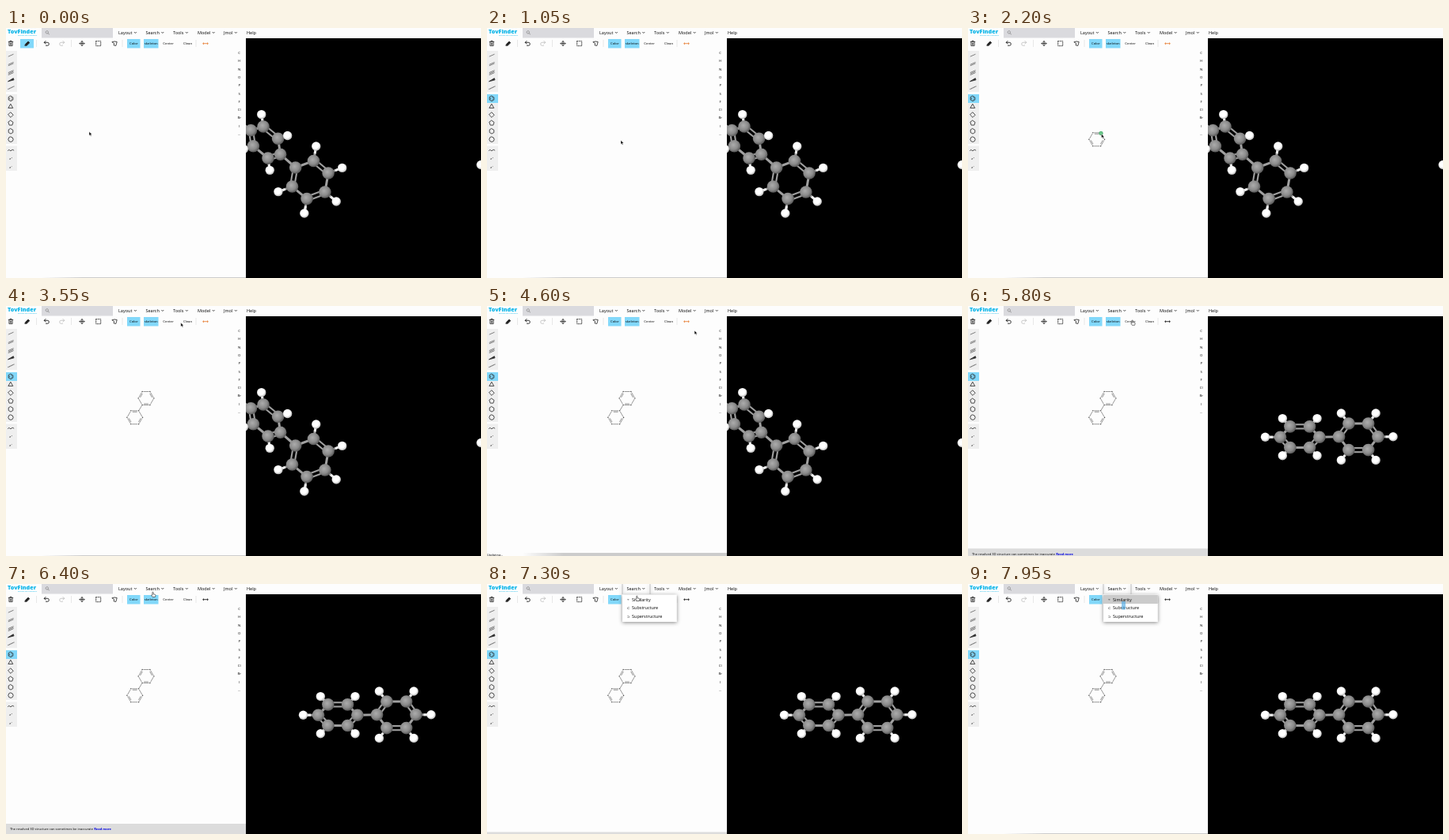
Recreate the animation shown at these times as an HTML page. Size 600x317 px, loop 8000 ms.

```html
<!DOCTYPE html>
<html lang="en">
<head>
<meta charset="utf-8">
<title>Molecule editor</title>
<style>
html, body { margin: 0; width: 100%; height: 100%; overflow: hidden; background: #fff }
svg { display: block; width: 100vw; height: 100vh; font-family: "Open Sans", "Noto Sans", sans-serif }
.line { fill: none; stroke: #222; stroke-width: .8; stroke-linecap: round; stroke-linejoin: round }
.menu { font-size: 5.5px }
.tool { font-size: 4.3px; text-anchor: middle }
.on { fill: #82d8fa }
#drop { filter: drop-shadow(0 1.5px 2.5px #0007) }
</style>
</head>
<body>
<svg id="stage" viewBox="0 0 600 317">
  <defs>
    <radialGradient id="carbon" cx=".42" cy=".4" r=".64">
      <stop offset="0" stop-color="#acacac"/><stop offset=".6" stop-color="#8a8a8a"/><stop offset="1" stop-color="#505050"/>
    </radialGradient>
    <radialGradient id="hydrogen" cx=".45" cy=".42" r=".62">
      <stop offset=".55" stop-color="#fff"/><stop offset="1" stop-color="#aaa"/>
    </radialGradient>
    <linearGradient id="fade">
      <stop offset="0" stop-color="#ccc" stop-opacity="0"/><stop offset=".2" stop-color="#ccc"/>
    </linearGradient>
    <clipPath id="view"><path d="M303 13H600V317H303z"/></clipPath>
  </defs>
  <path fill="#fdfdfd" d="M0 0H600V317H0z"/>
  <path fill="#efefef" d="M0 29H14V81H0zM0 84H14V147H0zM0 149.500H14V181H0z"/>
  <path fill="#dadade" d="M45 0H135V12.500H45z"/>
  <path id="shade" fill="url(#fade)" d="M45 0H303V4H45z"/>
  <path d="M303 13H600V317H303z"/>

  <text x="2" y="7.400" font-size="7.200" font-weight="800" fill="#08b4e8">TovFinder</text>
  <text x="15" y="10.200" font-size="2.400" fill="#08b4e8">Explore the chemistry</text>
  <path class="line" style="stroke:#888" d="M53.100 6.500a1.700 1.700 0 1 0 -.1 .1L54.600 8"/>

  <path id="pen" class="on" d="M18 14H35V25.500H18z"/>
  <path id="ring" class="on" d="M0 84H14V95H0z"/>
  <path class="on" d="M153 14H169.500V25.500H153zM174 14H192.500V25.500H174z"/>
  <path stroke="#ddd" stroke-width=".7" d="M38.500 15v9M82.500 15v9M147 15v9M240 15v9"/>

  <g class="line">
    <path d="M3.200 17.400H8.800M5 17V16.300H7V17M3.900 17.600V22.600H8.100V17.600M5.300 19V21.300M6.700 19V21.300"/>
    <path d="M24.500 20.500L28 17L29.800 18.700L26.200 22.200L24.200 22.400z" fill="#222"/>
    <path id="undo" stroke="currentColor" d="M50 16.500L48.200 18.300L50 20.100M48.400 18.300H52.300a2 2 0 0 1 0 4H50.500"/>
    <use href="#undo" color="#bbb" transform="matrix(-1 0 0 1 122 0)"/>
    <path stroke-dasharray="1.200 1.300" d="M113.700 16.700h6v6h-6z"/>
    <path d="M134.200 17.700L137 17L140.200 17.600L138.800 22.500L136 21.800L136.600 20z"/>
    <path d="M2.800 67.600L9.300 63.700L9.900 65.500z" fill="#222"/>
    <path d="M2.800 77.500L10 74" stroke="#777" stroke-dasharray=".4 1.200" stroke-width="1.200"/>
    <path d="M2.500 155.500Q3.500 153.500 4.700 155T7 155T9.800 155"/>
  </g>
  <g id="icons"></g>
  <g class="tool" font-style="italic"><text x="6" y="167">e⁺</text><text x="6" y="177.500">e⁻</text></g>
  <path id="resolve" fill="none" stroke-width=".9" d="M248.700 19.700h6.600M250 18.500l-1.300 1.200l1.300 1.200M254 18.500l1.300 1.200l-1.300 1.200"/>

  <g id="sketch1"></g>
  <g id="sketch2"></g>
  <circle id="hot" cx="168" cy="133.500" r="2.300" fill="#6cc98a" stroke="#259650" stroke-width=".6"/>

  <g clip-path="url(#view)"><g id="model1"></g><g id="model2"></g></g>

  <text id="status" x="0" y="317" font-size="4">Updating…</text>
  <g id="bar">
    <path fill="#dcdcdc" d="M0 304H303V318H0z"/>
    <text x="5" y="312" font-size="4.070">The resolved 3D structure can sometimes be inaccurate <tspan font-weight="700" fill="#0000e0">Read more</tspan></text>
  </g>

  <g id="drop">
    <path fill="#fff" d="M171 13.500h68.800v34.500h-68.800z"/>
    <path id="row" fill="#cbcbcb" d="M171 14h68.800v11h-68.800z"/>
    <path fill="none" stroke="#999" stroke-width=".6" d="M171 13V0M206 0V13"/>
  </g>

  <path id="arrow" d="M0 0V4.900L1.200 3.800L2 5.700L2.900 5.300L2.100 3.500H3.600z" stroke="#fff" stroke-width=".4"/>
  <path id="hand" d="M-.6 0Q0 -.6 .6 0V2.300L3 2.900Q3.600 3.200 3.400 4.100L2.900 6H-.4L-2 3.800Q-1.800 2.900 -.6 3.700z" fill="#fff" stroke="#222" stroke-width=".6"/>
  <rect id="press" x="-2" y="-2" width="5" height="10.500" rx="1" fill="#4fa9e4" opacity=".65"/>
</svg>
<script>
const $ = id => document.getElementById(id);

function add(parent, tag, attrs, text = '') {
  const el = document.createElementNS('http://www.w3.org/2000/svg', tag);
  for (const key in attrs) el.setAttribute(key, attrs[key]);
  el.textContent = text;
  parent.append(el);
  return el;
}

// Corners of an n-sided ring spanned by the axes u and v
const corners = (n, [x, y], u, v, turn = 0, r = 1) => Array.from({ length: n }, (_, i) => {
  const a = turn + i * 2 * Math.PI / n, c = r * Math.cos(a), s = r * Math.sin(a);
  return [x + u[0] * c + v[0] * s, y + u[1] * c + v[1] * s];
});
const flat = (n, x, y, r, turn) => corners(n, [x, y], [r, 0], [0, r], turn);

// Line between two points, cut short at both ends and shifted sideways
function bond(parent, [ax, ay], [bx, by], stroke, width, shift = 0, cut = 0) {
  const len = Math.hypot(bx - ax, by - ay), ux = (bx - ax) / len, uy = (by - ay) / len;
  add(parent, 'line', {
    x1: ax + ux * cut - uy * shift, y1: ay + uy * cut + ux * shift,
    x2: bx - ux * cut - uy * shift, y2: by - uy * cut + ux * shift,
    stroke, 'stroke-width': width
  });
}

const icons = $('icons');
const line = d => add(icons, 'path', { class: 'line', d });

Object.entries({ Layout: 142, Search: 176.5, Tools: 211, Model: 242, Jmol: 275, Help: 304 }).forEach(([name, x]) => {
  const label = add(icons, 'text', { class: 'menu', x, y: 7.8 }, name);
  if (name !== 'Help') line(`M${x + label.getComputedTextLength() + 2.8} 5.3l1.2 1.2l1.2 -1.2`);
});
Object.entries({ Color: 161.3, skeleton: 183.2, Center: 205, Clean: 229.5 })
  .forEach(([name, x]) => add(icons, 'text', { class: 'tool', x, y: 21.3 }, name));
['C', 'H', 'N', 'O', 'P', 'S', 'F', 'Cl', 'Br', 'I', '…']
  .forEach((name, i) => add(icons, 'text', { class: 'tool', x: 294.7, y: 33 + i * 10.3 }, name));
[['≈', 'Similarity'], ['⊂', 'Substructure'], ['⊃', 'Superstructure']].forEach(([sign, name], i) => {
  add($('drop'), 'text', { class: 'tool', x: 178.5, y: 21.2 + i * 10.8 }, sign);
  add($('drop'), 'text', { class: 'menu', x: 183, y: 21.5 + i * 10.8 }, name);
});

// Move arrows, bond and ring icons
for (let i = 0; i < 4; i++)
  line('M0 0V-3M-1 -2L0 -3L1 -2').setAttribute('transform', `translate(96 19.6) rotate(${i * 90})`);
for (let n = 1; n <= 3; n++)
  for (let i = 0; i < n; i++)
    bond(icons, [2.8, 26 + n * 10.2 + i * 1.5], [9.5, 23 + n * 10.2 + i * 1.5], '#333', .6);
[6, 3, 4, 5, 6, 8].forEach((n, i) =>
  add(icons, 'polygon', { class: 'line', points: flat(n, 6, 89.5 + i * 10.35, 3.2, -Math.PI / 2) }));
const inner = flat(6, 6, 89.5, 1.7, -Math.PI / 2);
for (let i = 0; i < 6; i += 2) bond(icons, inner[i], inner[i + 1], '#222', .6);

function sketch(parent, x, y, first) {
  const p = flat(6, x, y, 9.8);
  p.forEach((a, i) => {
    const b = p[(i + 1) % 6];
    bond(parent, a, b, '#555', .6, 0, 1.3);
    if (i % 2 === first) bond(parent, a, b, '#555', .6, 1.5, 2);
    add(parent, 'circle', { cx: a[0], cy: a[1], r: .75, fill: '#444' });
  });
  return p;
}
const low = sketch($('sketch1'), 162.7, 141.3, 0);
const high = sketch($('sketch2'), 177, 117, 1);
bond($('sketch2'), low[5], high[2], '#555', .6, 0, 1);

// Two tilted benzene rings [centre, u, v], joined from corner 0 to corner 3
function model(parent, rings) {
  const carbons = rings.map(r => corners(6, ...r));
  const hydrogens = rings.map(r => corners(6, ...r, 0, 1.77));
  const ball = ([cx, cy], r, kind) => add(parent, 'circle', { cx, cy, r, fill: `url(#${kind})` });
  const linked = [0, 3];
  bond(parent, carbons[0][0], carbons[1][3], '#a0a0a0', 3);
  carbons.forEach((p, k) => p.forEach((a, i) => {
    const b = p[(i + 1) % 6], h = hydrogens[k][i];
    if (i % 2) bond(parent, a, b, '#a0a0a0', 3);
    else [-2.6, 2.6].forEach(s => bond(parent, a, b, '#a0a0a0', 2.1, s));
    if (i === linked[k]) return;
    bond(parent, a, h, '#a0a0a0', 3);
    bond(parent, [(a[0] + h[0]) / 2, (a[1] + h[1]) / 2], h, '#eee', 3);
  }));
  carbons.flat().forEach(c => ball(c, 7.8, 'carbon'));
  hydrogens.forEach((p, k) => p.forEach((h, i) => i !== linked[k] && ball(h, 5.7, 'hydrogen')));
}
model($('model1'), [[[328, 145], [18.6, 15.2], [-7.3, 14.3]], [[384.3, 192.5], [18.6, 15.5], [-15.6, 18.8]]]);
add($('model1'), 'circle', { cx: 600, cy: 173.5, r: 5.7, fill: 'url(#hydrogen)' });
model($('model2'), [[[419.2, 166.2], [24.7, 0], [0, 15.4]], [[493.3, 165.8], [24.7, 0], [0, -19.4]]]);

// Pointer moves: start, end, x, y; it rests in between
const moves = [
  [0, 1, 105, 131.5], [100, 600, 5.5, 89], [750, 1050, 169, 142.5], [1050, 1350, 163, 141.5],
  [1650, 2000, 168.5, 134.5], [2750, 3100, 185, 28], [3300, 3550, 220.8, 21.3], [3750, 4000, 252, 19],
  [4550, 4800, 349, 136], [4800, 5050, 192, 48], [5300, 5500, 207.7, 18.3],
  [6000, 6400, 185.5, 10.5], [6950, 7800, 196, 24]
];
const ramp = (t, from, to) => Math.min(1, Math.max(0, (t - from) / (to - from)));
const pointer = t => moves.reduce(([px, py], [from, to, x, y]) => {
  const k = ramp(t, from, to), e = k * k * (3 - 2 * k);
  return [px + (x - px) * e, py + (y - py) * e];
}, moves[0].slice(2));

const show = (id, on) => { $(id).style.display = on ? '' : 'none'; };
const place = (id, x, y) => $(id).setAttribute('transform', `translate(${x} ${y})`);

function draw(now) {
  const t = Math.floor(now % 8000 / 50) * 50;
  const between = (a, b) => t >= a && t < b;
  const loading = between(4150, 5700);
  show('pen', t < 750);
  show('ring', t >= 550);
  show('sketch1', t >= 1400);
  show('hot', between(1950, 2900));
  show('sketch2', t >= 2300);
  show('model1', t < 5700);
  show('model2', t >= 5700);
  show('status', loading);
  show('bar', between(5700, 7400));
  show('drop', t >= 7000);
  show('row', t >= 7850);
  $('resolve').setAttribute('stroke', t < 5700 ? '#e8843c' : '#222');
  place('shade', 0, loading ? 313 : 316);
  place('bar', 0, 14 * (1 - ramp(t, 5650, 5850) + ramp(t, 7000, 7400)));

  const [x, y] = pointer(t);
  const press = t >= 7850;
  const hand = !press && (between(550, 800) || between(3950, 4600) || t >= 5400);
  show('arrow', !hand && !press);
  show('hand', hand);
  show('press', press);
  ['arrow', 'hand', 'press'].forEach(id => place(id, x, y));
  requestAnimationFrame(draw);
}
requestAnimationFrame(draw);
</script>
</body>
</html>
```
